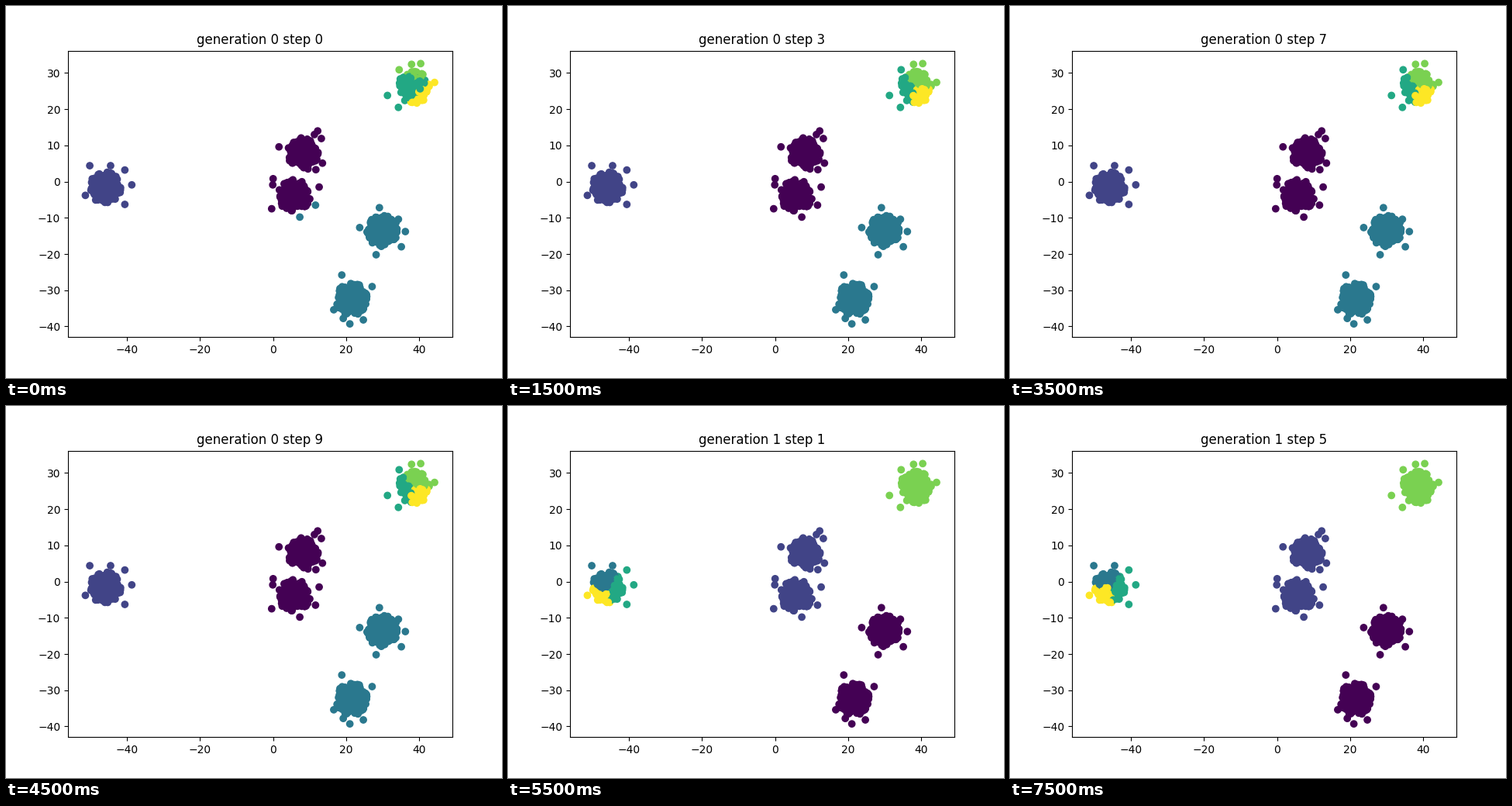
Recreate the animation shown at these times as a matplotlib script. Size 640 by 480 pixels, loop 8 s.

```python
import numpy as np
import matplotlib.pyplot as plt
from matplotlib.animation import FuncAnimation

STEPS = 10          # steps per generation
FRAMES = 16
PER_BLOB = 220
RADIUS = 4.45       # dense body of a blob

# Blob centre -> stray points around it.
BLOBS = {
    (-46, -1.5): [(-50.2, 4.4), (-44.5, 4.4), (-40.6, 3.2), (-51.4, -3.8),
                  (-38.7, -0.9), (-40.6, -6.3)],
    (8.1, 7.7): [(1.6, 9.6), (12.2, 14), (11.3, 13), (13.2, 11.9),
                 (13.5, 5.1), (11.7, 3.3)],
    (5.8, -3.9): [(0, 0.8), (-0.1, -0.9), (-0.4, -7.5), (7.3, -9.8),
                  (11.6, -6.5), (12.6, -1.5)],
    (38.5, 26): [(40.4, 32.6), (37.9, 32.4), (34.5, 30.9), (31.3, 23.8),
                 (34.3, 20.5), (44.2, 27.4)],
    (30, -13.7): [(29.1, -7.2), (23.7, -12.7), (34.3, -10.4),
                  (36.2, -13.8), (35.1, -18), (28.2, -20.2)],
    (21.6, -32.5): [(18.8, -25.8), (16.6, -35.4), (19.2, -37.8),
                    (21, -39.3), (24.7, -38.2), (27.1, -29)],
}

WEST, MIDDLE, SOUTH, NORTH = (-46, -1), (7, 2), (25.5, -23), (38, 26)

# First centroids, settled centroids, share of the gap left after each step.
GENERATIONS = [
    ([(-0.5, 4.7), WEST, (19.1, -20.6),
      (39, 27.1), (39.6, 30.5), (41.8, 24.4)],
     [MIDDLE, WEST, SOUTH, (36, 25), (39.6, 27.4), (39.6, 25)], 0.25),
    ([SOUTH, (4.85, 6.8), (-47.8, -1.4),
      (-43.8, -3.1), (9.75, 3.3), (-49.4, -5.2)],
     [SOUTH, MIDDLE, (-47.3, 0.3), (-42.7, -2.6), NORTH, (-47.7, -3)], 0.4),
]


def body(centre, rng):
    """Points of a normal distribution cut off at two sigma."""
    u, turn = rng.random((2, PER_BLOB))
    r = RADIUS * np.sqrt(-np.log(1 - u * (1 - np.exp(-2))) / 2)
    a = 2 * np.pi * turn
    return np.column_stack([r * np.cos(a), r * np.sin(a)]) + centre


def make_points(rng):
    parts = [np.vstack([body(c, rng), strays]) for c, strays in BLOBS.items()]
    return rng.permutation(np.vstack(parts))


def labels_at(gen, step):
    first, last, rate = GENERATIONS[gen]
    first, last = np.array(first), np.array(last)
    centroids = last + (first - last) * rate**step
    gaps = points[:, None] - centroids
    return (gaps**2).sum(axis=2).argmin(axis=1)


points = make_points(np.random.default_rng(7))

fig, ax = plt.subplots(figsize=(6.4, 4.8), dpi=100)
dots = ax.scatter(*points.T, c=labels_at(0, 0), cmap="viridis", vmin=0, vmax=5)
ax.set_xlim(-56.16, 49.08)
ax.set_ylim(-42.95, 36.18)
title = ax.set_title("")


def update(i):
    gen, step = divmod(i, STEPS)
    dots.set_array(labels_at(gen, step))
    title.set_text(f"generation {gen} step {step}")
    return dots, title


anim = FuncAnimation(fig, update, frames=FRAMES, interval=500, repeat=True)
plt.show()
```
